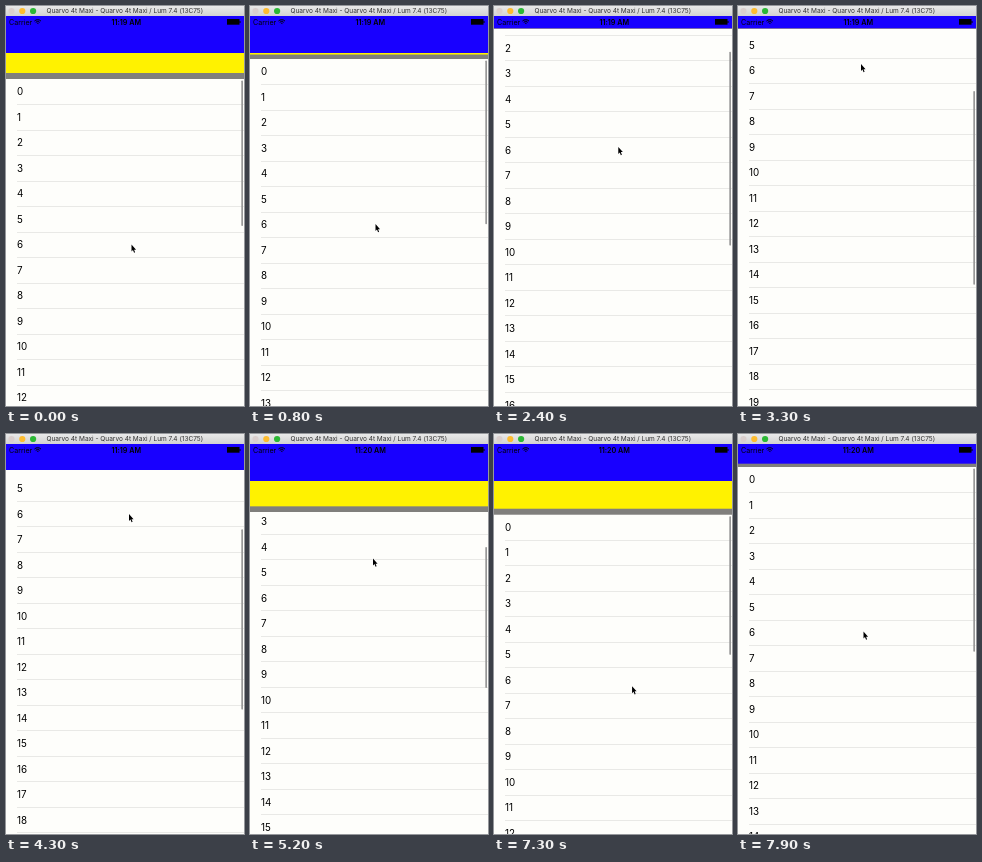
Animation of 238x400 px, one loop 8000 ms. Source, as an HTML page with a canvas:

```html
<!DOCTYPE html>
<html>
<head>
<meta charset="utf-8">
<style>
html, body { margin: 0; width: 100%; height: 100%; overflow: hidden; background: #fefefb; }
canvas { display: block; }
</style>
</head>
<body>
<canvas id="stage" width="238" height="400"></canvas>
<script>
const g = document.getElementById('stage').getContext('2d');
const W = 238, H = 400, ROW = 25.5, ROWS = 30, LOOP = 8000, STEP = 100;
const MIN = 22.5, MAX = 85, GRAY = 6, SHADE_LAG = 250;
const FONT = 'Inter, "Liberation Sans", sans-serif';

// Turning points of the drag; the header height is limited to MIN..MAX afterwards
const keys = [
  { t: 0, x: 125.5, y: 238.5, header: 73, scroll: 0 },
  { t: 1600, x: 125.5, y: 197.5, header: 33, scroll: 0 },
  { t: 1900, x: 125, y: 187, header: 22, scroll: 0 },
  { t: 3300, x: 123, y: 58, header: 13, scroll: 123.5 },
  { t: 4300, x: 123, y: 80, header: 36, scroll: 121.6 },
  { t: 5200, x: 123, y: 124.5, header: 78, scroll: 79.6 },
  { t: 6500, x: 121.5, y: 238, header: 120, scroll: -17 },
  { t: 7200, x: 138, y: 260, header: 89, scroll: 0 },
  { t: 7900, x: 138.5, y: 205.5, header: 31, scroll: 0 }
];

const clamp = (v, lo, hi) => Math.min(hi, Math.max(lo, v));

function at(name, t) {
  const i = clamp(keys.findIndex(k => k.t > t), 1, keys.length - 1);
  const a = keys[i - 1], b = keys[i];
  return a[name] + (b[name] - a[name]) * clamp((t - a.t) / (b.t - a.t), 0, 1);
}

const headerAt = t => clamp(at('header', t), MIN, MAX);

function rect(x, y, w, h, color) {
  g.fillStyle = color;
  g.fillRect(x, y, w, h);
}

function text(s, x, y, size, color, align = 'left', weight = 400) {
  g.font = `${weight} ${size}px ${FONT}`;
  g.textAlign = align;
  g.fillStyle = color;
  g.fillText(s, x, y);
}

function drawList(bottom, scroll) {
  const over = Math.max(0, -scroll);
  for (let i = 0; i < ROWS; i++) {
    const y = bottom - scroll + i * ROW, line = Math.round(y + ROW - .5);
    text(i, 11, y + 16.2, 9.8, '#000');
    if (over < 4 && line > bottom + GRAY) rect(11, line, W - 11, 1, '#e9e9e6');
  }
  const view = H - bottom;
  const barTop = bottom + 1.5 + Math.max(0, scroll) / (ROW * ROWS) * view;
  g.fillStyle = '#979797';
  g.beginPath();
  g.roundRect(235.3, barTop, 1.7, view * view / 735 - over, .8);
  g.fill();
}

function drawHeader(bottom, gray) {
  const colorEnd = bottom - gray;
  rect(0, 10, W, bottom - 10, '#807f7c');
  rect(0, 10, W, colorEnd - 10, '#fff200');
  rect(0, 10, W, Math.min(47, colorEnd) - 10, '#1800ff');
}

function drawStatus(time) {
  text('Carrier', 3, 18.5, 7.1, '#000');
  g.strokeStyle = '#000';
  g.lineWidth = 1;
  for (const r of [1, 2.8, 4.6]) {
    g.beginPath();
    g.arc(31.7, 18.3, r, -Math.PI * .75, -Math.PI * .25);
    g.stroke();
  }
  text(time, 120.3, 18.5, 7.2, '#000', 'center', 600);
  rect(221, 13, 12.5, 5.7, '#000');
  rect(233.5, 15, 1, 2, '#000');
}

function drawTitle() {
  const fill = g.createLinearGradient(0, 0, 0, 10);
  fill.addColorStop(0, '#e9e9e9');
  fill.addColorStop(1, '#d2d2d2');
  rect(0, 0, W, 10, fill);
  ['#dacfcd', '#fdbc30', '#2cb835'].forEach((c, i) => {
    g.fillStyle = c;
    g.beginPath();
    g.arc(5.5 + i * 10.8, 5, 3.1, 0, 7);
    g.fill();
  });
  text('Quarvo 4t Maxi - Quarvo 4t Maxi / Lum 7.4 (13C75)', 118.8, 7.2, 6.52, '#333', 'center');
}

function drawPointer(x, y) {
  const p = new Path2D('M0 0V7.4L1.7 5.9L2.9 8.7L4.1 8.2L2.9 5.4H5.2Z');
  g.save();
  g.translate(x, y);
  g.scale(.88, .95);
  g.strokeStyle = '#fff';
  g.lineWidth = 1;
  g.stroke(p);
  g.fillStyle = '#000';
  g.fill(p);
  g.restore();
}

function frame(now) {
  const t = Math.floor(now % LOOP / STEP) * STEP;
  const bottom = headerAt(t);
  // The gray edge fades in and out slightly behind the header
  const gray = clamp((headerAt(t - SHADE_LAG) - 33) * .17, 0, GRAY);
  rect(0, 0, W, H, '#fefefb');
  drawList(bottom, at('scroll', t));
  drawHeader(bottom, gray);
  drawStatus(t < 4700 ? '11:19 AM' : '11:20 AM');
  drawTitle();
  drawPointer(at('x', t), at('y', t));
}

let start;
function tick(now) {
  start ??= now;
  frame(now - start);
  requestAnimationFrame(tick);
}
frame(0);
requestAnimationFrame(tick);
</script>
</body>
</html>
```
